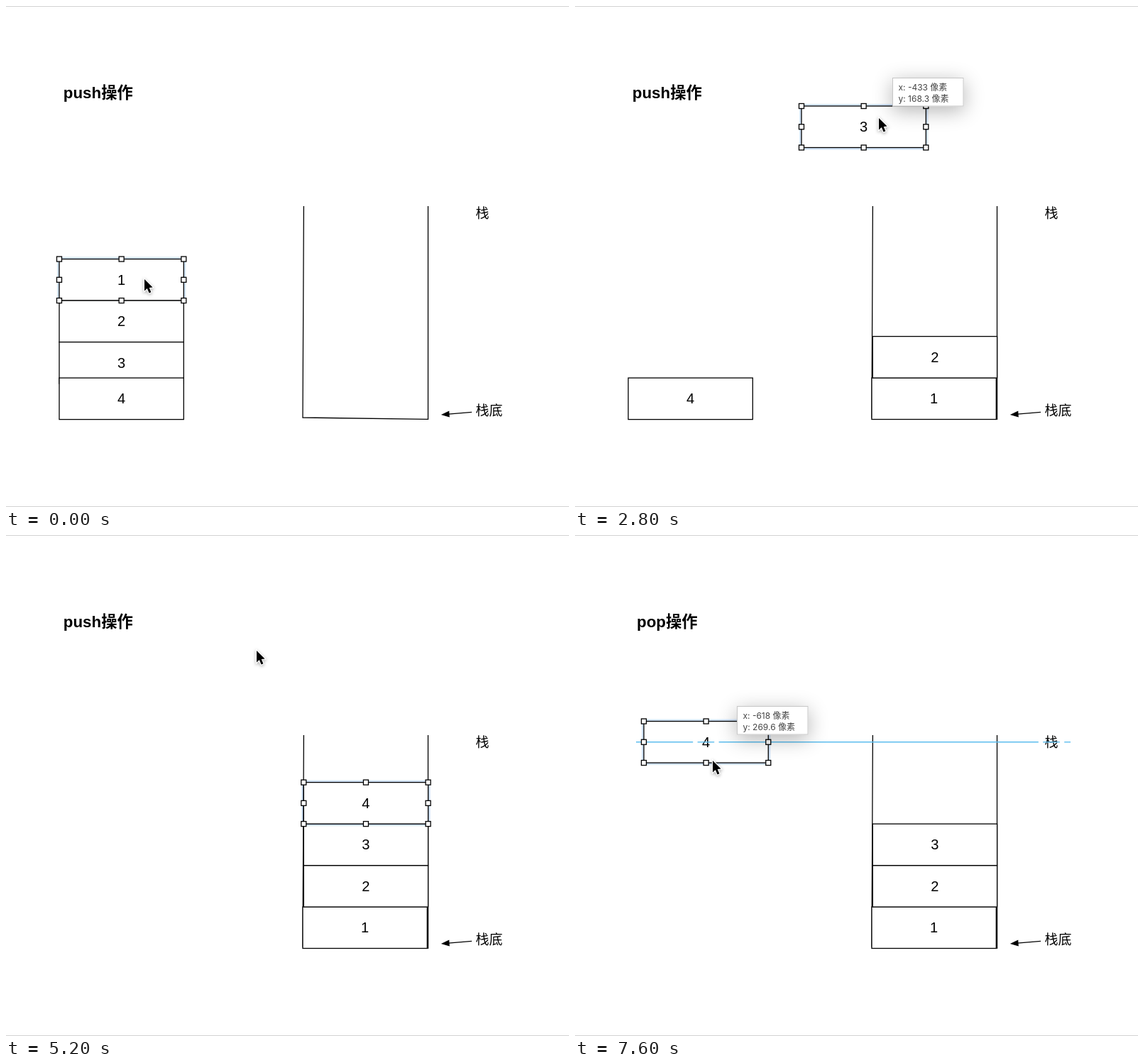
An HTML page with a canvas for the animation above (8000 ms loop, 793x706 px).

```html
<!DOCTYPE html>
<html lang="zh">
<head>
<meta charset="utf-8">
<title>Stack push and pop</title>
<style>
html, body { margin: 0; width: 100%; height: 100%; overflow: hidden; background: #fff; }
canvas { display: block; }
</style>
</head>
<body>
<canvas id="stage" width="793" height="706"></canvas>
<script>
const c = document.getElementById('stage').getContext('2d');
const STEP = 400, W = 175.3, H = 58.5;
const CJK = '"Noto Sans CJK SC", "Noto Sans CJK", sans-serif';
const BLUE = '#5cbdee', SOFT = '#74c4f6';
const TIP = [19, -57];

const home = [[75, 356.6], [75, 415.1], [75, 473.6], [75, 524.1]];
const slot = [[417.96, 524], [419.28, 465.6], [419.28, 407.12], [419.28, 348.6]];

function line(color, width, ...pts) {
  c.strokeStyle = color;
  c.lineWidth = width;
  c.beginPath();
  pts.forEach(([x, y]) => c.lineTo(x, y));
  c.stroke();
}

function poly(color, ...pts) {
  c.fillStyle = color;
  c.beginPath();
  pts.forEach(([x, y]) => c.lineTo(x, y));
  c.closePath();
  c.fill();
}

function text(str, x, y, font, color = '#000', align = 'center') {
  c.font = font;
  c.fillStyle = color;
  c.textAlign = align;
  c.fillText(str, x, y);
}

// Alignment guide, broken on both sides of each object's centre
function guide(a, b, centers, point) {
  const cuts = centers.flatMap(m => [m - 15, m + 15]);
  let from = a;
  for (const cut of cuts) {
    line(BLUE, 1.4, point(from), point(cut - 3.2));
    from = cut + 3.2;
  }
  line(BLUE, 1.4, point(from), point(b));
}
const across = (y, a, b, ...centers) => guide(a, b, centers, x => [x, y]);
const down = (x, a, b, ...centers) => guide(a, b, centers, y => [x, y]);

// Equal-width marker with an hourglass at each end
function widthMark(y, a, b) {
  line(SOFT, 2.6, [a, y], [b, y]);
  for (const x of [a, b]) {
    poly(SOFT, [x - 3, y - 9], [x + 3, y - 9], [x, y]);
    poly(SOFT, [x - 3, y + 9], [x + 3, y + 9], [x, y]);
  }
}

function columnGuides(top, ...centers) {
  for (const x of [419.8, 506.9, 594.8]) down(x, top, 535, ...centers);
}

const steps = [
  { n: 1, at: home[0], cur: [195, 385] },
  { n: 1, at: [420, 226], cur: [538, 254], tip: TIP },
  { n: 1, at: [428, 527], cur: [545, 554], tip: TIP },
  { n: 1, at: slot[0], cur: [535, 551], tip: TIP, guides() {
    across(524.4, 64, 604, 162.6, 505.6);
    across(553.4, 64, 604, 162.6, 505.6);
    across(582.4, 64, 604, 162.6, 505.6);
    down(418.5, 272, 593, 432, 553);
  } },
  { n: 2, at: [277, 125], cur: [384, 153], tip: TIP },
  { n: 2, at: [418.56, 384.2], cur: [526, 412], tip: TIP,
    guides() { down(506.4, 272, 593); } },
  { n: 2, at: slot[1], cur: [328, 480] },
  { n: 3, at: [319, 141], cur: [428, 158], tip: TIP },
  { n: 3, at: [417.96, 384], cur: [523, 401], tip: TIP,
    guides() { down(505.8, 374, 593, 413, 553); } },
  { n: 3, at: slot[2], cur: [528, 424], tip: [18.5, -57], guides() {
    columnGuides(397, 436, 495);
    widthMark(465.6, 422, 592);
  } },
  { n: 4, at: [90, 335], cur: [193, 375], tip: TIP },
  { n: 4, at: [440.76, 224.36], cur: [544, 264], tip: [19, -70],
    guides() { widthMark(283, 443, 592); } },
  { n: 4, at: slot[3], cur: [524, 388], tip: TIP, guides() {
    columnGuides(339, 378, 436, 495);
    widthMark(407.1, 422, 592);
  } },
  { n: 4, at: slot[3], cur: [353, 163] },
  { n: 4, at: slot[3], cur: [113, 124] },
  { n: 4, at: slot[3], plain: true, beam: [130, 124.5], edit: true, mark: 52 },
  { n: 4, at: slot[3], plain: true, cur: [477, 378], edit: true, title: 'po p操作' },
  { n: 4, at: slot[3], plain: true, cur: [477, 378], edit: true, title: 'pop操作' },
  { n: 4, at: [419.28, 290], cur: [532, 326], tip: TIP, title: 'pop操作',
    guides() { down(506.9, 280, 535, 319, 436, 495); } },
  { n: 4, at: [96.96, 262.52], cur: [194, 318], tip: [34, -77], title: 'pop操作',
    guides() { across(291.8, 86, 698, 184.4, 671); } }
];

function drawTitle({ title = 'push操作', edit, mark }) {
  c.font = `bold 22.3px "Liberation Sans", ${CJK}`;
  const w = c.measureText(title).width, x = 129.8 - w / 2;
  if (edit) {
    c.strokeStyle = '#e3e3e3';
    c.lineWidth = 5;
    c.strokeRect(x - 5.5, 99.5, w + 11, 45.5);
    if (mark) {
      c.fillStyle = '#b3d7ff';
      c.fillRect(x, 106, mark, 33);
    }
    c.strokeStyle = '#9a9cd0';
    c.lineWidth = 1;
    c.strokeRect(Math.round(x) + .5, 106.5, Math.round(w), 32);
  }
  text(title, x, 130, c.font, '#000', 'left');
}

function drawScene() {
  c.fillStyle = '#fff';
  c.fillRect(0, 0, 793, 706);
  c.fillStyle = '#d2d2d2';
  c.fillRect(0, 0, 793, 1);
  c.fillRect(0, 705, 793, 1);
  line('#000', 1.3, [419.4, 282], [418, 580], [594.5, 582.4], [594.5, 282]);
  text('栈', 661.5, 298.5, `19px ${CJK}`, '#000', 'left');
  text('栈底', 661.5, 577, `19px ${CJK}`, '#000', 'left');
  line('#000', 1.3, [656, 572.4], [623, 575.2]);
  poly('#000', [612.8, 576], [624.2, 570.6], [624.8, 579.6]);
}

function drawBlock(n, [x, y], selected) {
  if (selected) {
    c.strokeStyle = 'rgba(120,175,240,.32)';
    c.lineWidth = 6;
    c.strokeRect(x, y, W, H);
  }
  c.fillStyle = '#fff';
  c.fillRect(x, y, W, H);
  c.strokeStyle = '#000';
  c.lineWidth = 1.3;
  c.strokeRect(x, y, W, H);
  text(n, x + W / 2, y + H / 2 + 6.8, '20px "Liberation Sans", Arial, sans-serif');
}

function drawHandles([x, y]) {
  c.fillStyle = '#fff';
  c.strokeStyle = '#000';
  c.lineWidth = 1.3;
  for (let i = 0; i < 9; i++) {
    if (i === 4) continue;
    const hx = x + (i % 3) * W / 2, hy = y + Math.floor(i / 3) * H / 2;
    c.fillRect(hx - 3.5, hy - 3.5, 7, 7);
    c.strokeRect(hx - 3.5, hy - 3.5, 7, 7);
  }
}

function drawTip(x, y, at) {
  c.save();
  c.shadowColor = 'rgba(0,0,0,.3)';
  c.shadowBlur = 28;
  c.shadowOffsetY = 6;
  c.fillStyle = '#fff';
  c.fillRect(x, y, 100.5, 40.5);
  c.restore();
  c.strokeStyle = '#c6c6c6';
  c.lineWidth = 1;
  c.strokeRect(x + .5, y + .5, 99.5, 39.5);
  const docX = +(at[0] / 1.2 - 698.8).toFixed(1);
  const docY = +((at[1] + 61) / 1.2).toFixed(1);
  const font = `12px Inter, ${CJK}`;
  text(`x: ${docX} 像素`, x + 8.5, y + 17.8, font, '#444', 'left');
  text(`y: ${docY} 像素`, x + 8.5, y + 33.6, font, '#444', 'left');
}

function drawCursor(x, y) {
  c.save();
  c.translate(x, y);
  c.beginPath();
  [[0, 0], [0, 16.5], [3.8, 13], [6.6, 19.4], [9.4, 18.2], [6.7, 12], [11.6, 11.6]]
    .forEach(([px, py]) => c.lineTo(px, py));
  c.closePath();
  c.shadowColor = 'rgba(0,0,0,.35)';
  c.shadowBlur = 4;
  c.shadowOffsetY = 1.5;
  c.strokeStyle = '#fff';
  c.lineWidth = 2.4;
  c.stroke();
  c.shadowColor = 'transparent';
  c.fillStyle = '#000';
  c.fill();
  c.restore();
}

function drawBeam(x, y) {
  for (const [color, width] of [['#fff', 3], ['#000', 1.2]]) {
    line(color, width, [x - 3.5, y - 8.5], [x, y - 6.5], [x, y + 6.5], [x - 3.5, y + 8.5]);
    line(color, width, [x + 3.5, y - 8.5], [x, y - 6.5], [x, y + 6.5], [x + 3.5, y + 8.5]);
    line(color, width, [x - 2.5, y + 3], [x + 2.5, y + 3]);
  }
}

function draw(s) {
  drawScene();
  drawTitle(s);
  for (let n = 1; n <= 4; n++) {
    const at = n === s.n ? s.at : (n < s.n ? slot : home)[n - 1];
    drawBlock(n, at, n === s.n && !s.plain);
  }
  if (s.guides) s.guides();
  if (!s.plain) drawHandles(s.at);
  if (s.tip) drawTip(s.cur[0] + s.tip[0], s.cur[1] + s.tip[1], s.at);
  if (s.cur) drawCursor(...s.cur);
  if (s.beam) drawBeam(...s.beam);
}

function tick() {
  draw(steps[Math.floor(performance.now() / STEP) % steps.length]);
  requestAnimationFrame(tick);
}
tick();
</script>
</body>
</html>
```
